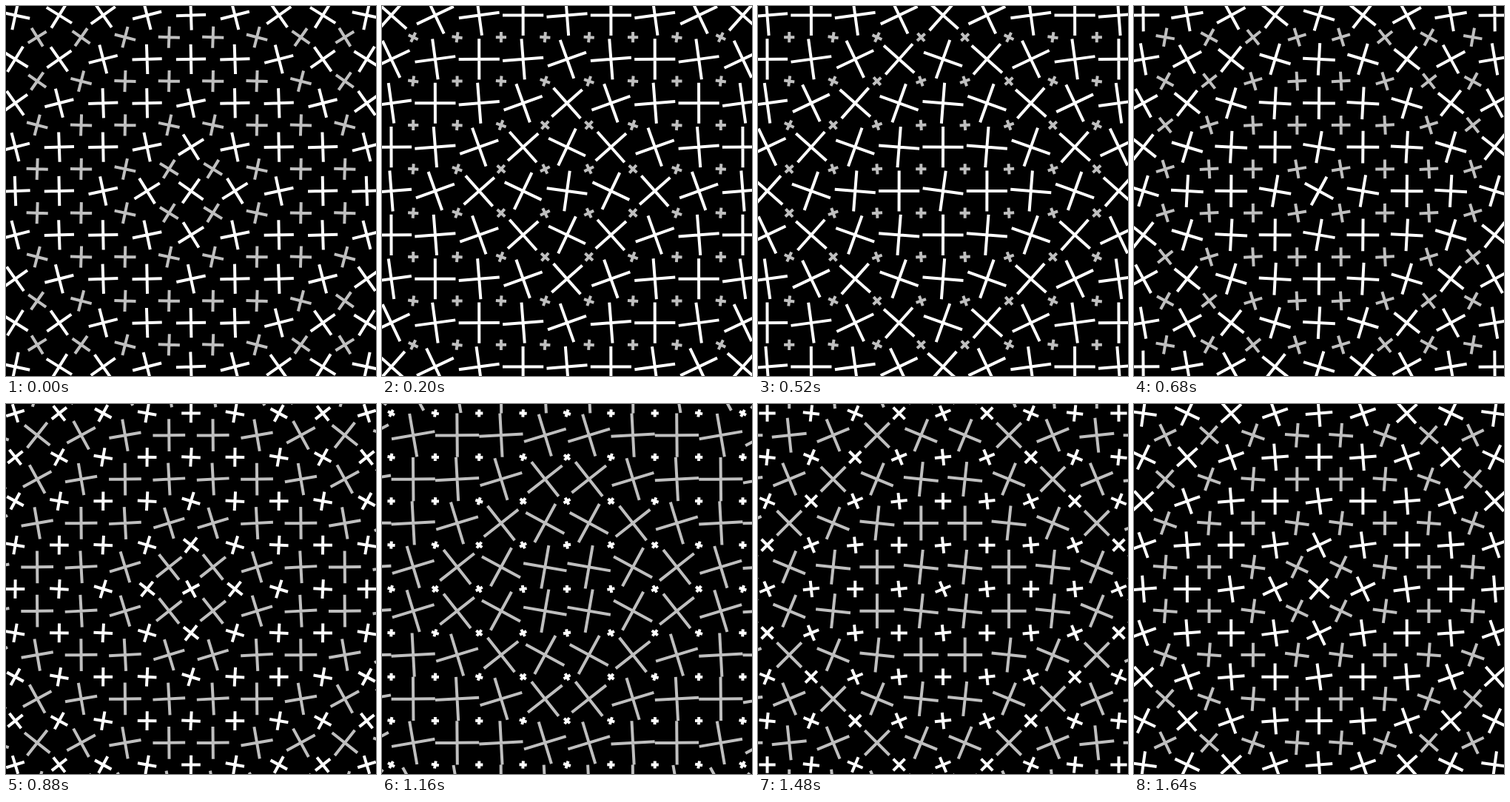
An HTML page with a canvas that plays this animation: 500x500 px, repeating every 1680 ms.

```html
<!DOCTYPE html>
<html lang="en">
<head>
<meta charset="utf-8">
<title>Turning crosses</title>
<style>
  html, body { margin: 0; width: 100%; height: 100%; overflow: hidden; background: #000; }
  canvas { display: block; }
</style>
</head>
<body>
<canvas id="stage" width="500" height="500"></canvas>
<script>
const ctx = document.getElementById('stage').getContext('2d');
const LOOP = 1680, STEP = 40, PEAK = 360;
const GAP = 475 / 8, CENTER = 250;
const MID = 17.35, SWING = 12.4;

function cross(x, y, half, angle) {
  const c = Math.cos(angle) * half, s = Math.sin(angle) * half;
  ctx.moveTo(x - c, y - s);
  ctx.lineTo(x + c, y + s);
  ctx.moveTo(x + s, y - c);
  ctx.lineTo(x - s, y + c);
}

// The turn spreads outwards in diamond-shaped rings; dir is +1 or -1.
function lattice(reach, color, dir, phase) {
  const half = MID + dir * SWING * Math.cos(phase);
  ctx.strokeStyle = color;
  ctx.beginPath();
  for (let i = -reach; i <= reach; i++) {
    for (let j = -reach; j <= reach; j++) {
      const ring = Math.abs(i) + Math.abs(j);
      const angle = dir * Math.PI / 4 * (1 - Math.cos(ring * Math.PI / 6 - phase));
      cross(CENTER + i * GAP, CENTER + j * GAP, half, angle);
    }
  }
  ctx.stroke();
}

function draw() {
  const t = Math.floor(performance.now() % LOOP / STEP) * STEP;
  const phase = 2 * Math.PI * (t - PEAK) / LOOP;
  ctx.fillStyle = '#000';
  ctx.fillRect(0, 0, 500, 500);
  ctx.lineWidth = 4;
  lattice(4.5, '#bfbfbf', -1, phase);
  lattice(4, '#fff', 1, phase);
  requestAnimationFrame(draw);
}
draw();
</script>
</body>
</html>
```
